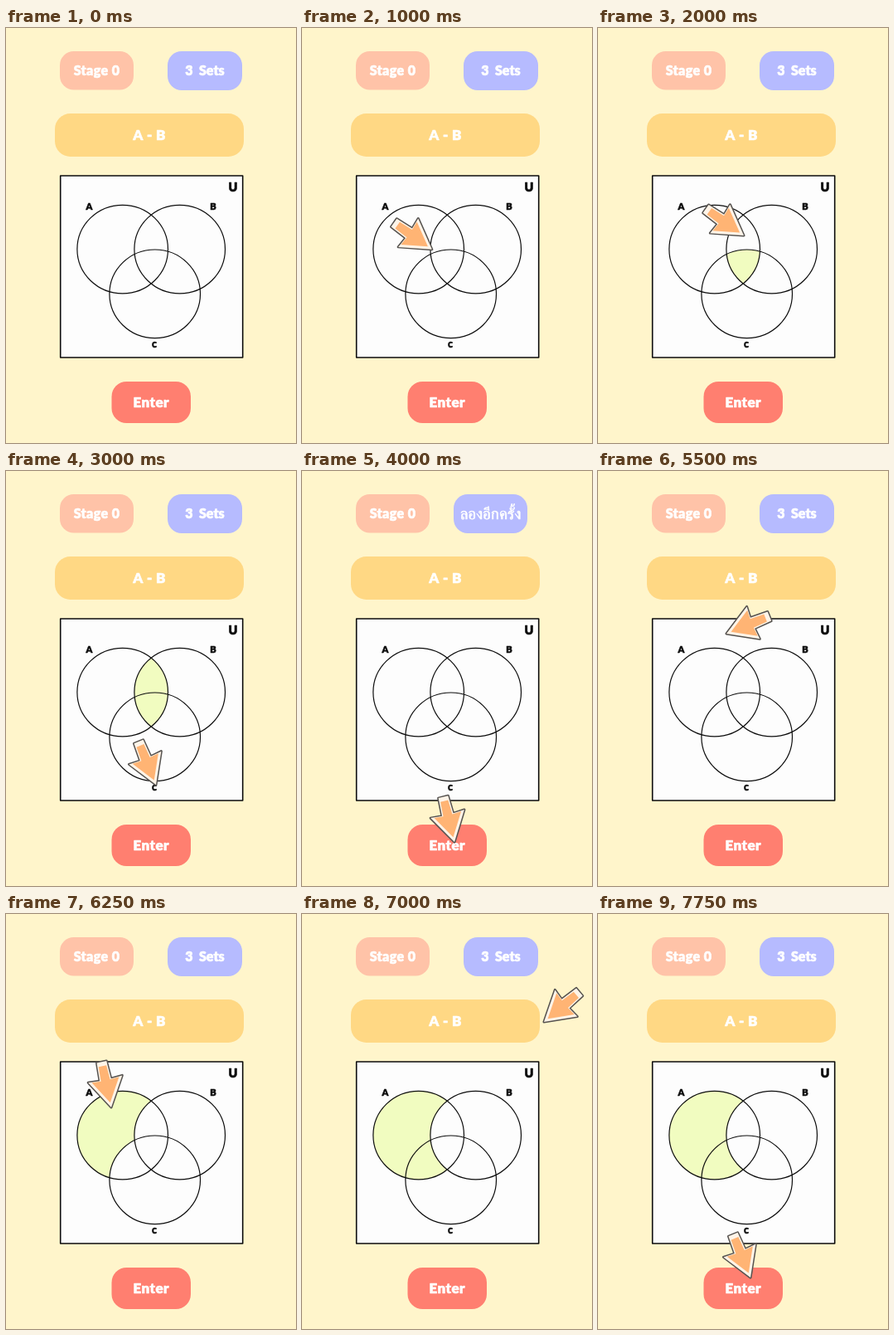
Recreate the animation shown at these times as an HTML page with a canvas. Size 350 px wide and 500 px high, loop 8 s.

```html
<!DOCTYPE html>
<html lang="en">
<head>
<meta charset="utf-8">
<title>Venn diagram exercise</title>
<style>
  html, body { margin: 0; width: 100%; height: 100%; overflow: hidden; background: #fff5cb; }
  canvas { display: block; }
</style>
</head>
<body>
<canvas id="stage" width="350" height="500"></canvas>
<script>
const ctx = document.getElementById('stage').getContext('2d');
const W = 350, H = 500, LOOP = 8000, ROUND = LOOP / 2, STEP = 250;
const INK = '#0c0c0c', LILAC = '#b6bbff';

const SETS = {
  A: { x: 140.7, y: 266.6 },
  B: { x: 209.7, y: 266.6 },
  C: { x: 179.7, y: 320.3 }
};

// Clicked regions, cleared with each round; lower case means outside that set.
const CLICKS = [
  { at: 1500, region: 'ABC' },
  { at: 2250, region: 'ABc' },
  { at: 6000, region: 'Abc' },
  { at: 6750, region: 'AbC' }
];

// Places the pointer tip visits, with its heading in degrees
const STOPS = [
  { at: 250, x: 48, y: 152, heading: 35 },
  { at: 1250, x: 177, y: 288, heading: 35 },
  { at: 1750, x: 114, y: 42, heading: 35 },
  { at: 2000, x: 176, y: 250, heading: 35 },
  { at: 3000, x: 181, y: 378, heading: 68 },
  { at: 4000, x: 184, y: 447, heading: 76 },
  { at: 5000, x: 285, y: 44, heading: 158 },
  { at: 5500, x: 155, y: 196, heading: 158 },
  { at: 6250, x: 127, y: 233, heading: 78 },
  { at: 6500, x: 150, y: 297, heading: 68 },
  { at: 7000, x: 292, y: 130, heading: 140 },
  { at: 7750, x: 184, y: 438, heading: 68 }
];

const HALF_ARROW = [[0, 0], [-35, 21], [-34, 7], [-56, 6]];
const ARROW = [...HALF_ARROW, ...HALF_ARROW.slice(1).reverse().map(([x, y]) => [x, -y])];

const mix = (a, b, k) => a + (b - a) * k;
const ease = k => k * k * (3 - 2 * k);

function text(label, x, y, size, color = '#fff', weight = 900) {
  ctx.font = `${weight} ${size}px Lato, "Noto Sans", sans-serif`;
  ctx.textAlign = 'center';
  ctx.lineJoin = 'round';
  ctx.lineWidth = 0.6;
  ctx.fillStyle = ctx.strokeStyle = color;
  ctx.fillText(label, x, y);
  ctx.strokeText(label, x, y);
}

function pill(x, y, w, h, color, label, size, weight) {
  ctx.beginPath();
  ctx.roundRect(x, y, w, h, h * 0.36);
  ctx.fillStyle = color;
  ctx.fill();
  text(label, x + w / 2, y + h / 2 + size * 0.34, size, '#fff', weight);
}

function addCircle({ x, y }) {
  ctx.moveTo(x + 54.8, y);
  ctx.ellipse(x, y, 54.8, 53.3, 0, 0, Math.PI * 2);
}

function fillRegion(region) {
  ctx.save();
  for (const key of region) {
    const set = key.toUpperCase();
    ctx.beginPath();
    if (key !== set) ctx.rect(0, 0, W, H);
    addCircle(SETS[set]);
    ctx.clip('evenodd');
  }
  ctx.fillStyle = '#f1fcc0';
  ctx.fillRect(0, 0, W, H);
  ctx.restore();
}

function drawDiagram(t) {
  ctx.fillStyle = '#fdfdfd';
  ctx.fillRect(65.7, 178, 220, 219);
  const roundStart = Math.floor(t / ROUND) * ROUND;
  CLICKS.filter(c => c.at >= roundStart && c.at <= t).forEach(c => fillRegion(c.region));

  ctx.strokeStyle = INK;
  ctx.lineWidth = 1.6;
  ctx.strokeRect(65.7, 178, 220, 219);
  ctx.beginPath();
  Object.values(SETS).forEach(addCircle);
  ctx.lineWidth = 1.2;
  ctx.stroke();

  text('U', 274, 197, 14.5, INK);
  text('A', 100.5, 218.5, 11, INK);
  text('B', 250, 218.5, 11, INK);
  text('C', 179, 384.5, 8.5, INK);
}

// The retry notice lands large and settles at normal size.
function drawNotice(landing) {
  const scale = landing ? 3.55 : 1;
  ctx.save();
  ctx.globalAlpha = landing ? 0.5 : 1;
  ctx.translate(landing ? 186.5 : 227.5, 51.5);
  ctx.scale(scale, scale);
  pill(-44.5, -23.5, 89, 47, LILAC, 'ลองอีกครั้ง', 19, 500);
  ctx.restore();
}

function traceArrow(size, shift) {
  ctx.beginPath();
  for (const [x, y] of ARROW) ctx.lineTo(x * size - shift, y * size);
  ctx.closePath();
}

function drawPointer(t) {
  const i = STOPS.findLastIndex(s => s.at <= t);
  if (i < 0) return;
  const a = STOPS[i], b = STOPS[i + 1] || a;
  const k = a === b ? 0 : ease((t - a.at) / (b.at - a.at));

  ctx.save();
  ctx.translate(mix(a.x, b.x, k), mix(a.y, b.y, k));
  ctx.rotate(mix(a.heading, b.heading, k) * Math.PI / 180);
  ctx.lineJoin = 'round';
  traceArrow(1, 0);
  ctx.strokeStyle = '#55524f';
  ctx.lineWidth = 3;
  ctx.stroke();
  ctx.fillStyle = '#fff4e8';
  ctx.fill();
  traceArrow(0.8, 6);
  ctx.fillStyle = '#ffb474';
  ctx.fill();
  ctx.restore();
}

function draw(now) {
  const t = Math.floor((now % LOOP) / STEP) * STEP;
  ctx.fillStyle = '#fff5cb';
  ctx.fillRect(0, 0, W, H);
  ctx.letterSpacing = '0.4px';
  pill(65, 28, 89, 46.5, '#ffc3a8', 'Stage 0', 16);
  pill(59, 103, 228, 52, '#ffd884', 'A - B', 17);
  pill(127.5, 426, 95.5, 50, '#ff7f70', 'Enter', 17);
  ctx.letterSpacing = '0px';
  drawDiagram(t);

  const landing = t === ROUND - STEP;
  const retry = landing || (t >= ROUND && t < 5000);
  if (landing || !retry) pill(195, 28, 90, 47, LILAC, '3  Sets', 16);
  if (retry) drawNotice(landing);
  drawPointer(t);
}

const start = performance.now();
function tick() {
  draw(performance.now() - start);
  requestAnimationFrame(tick);
}
tick();
</script>
</body>
</html>
```
